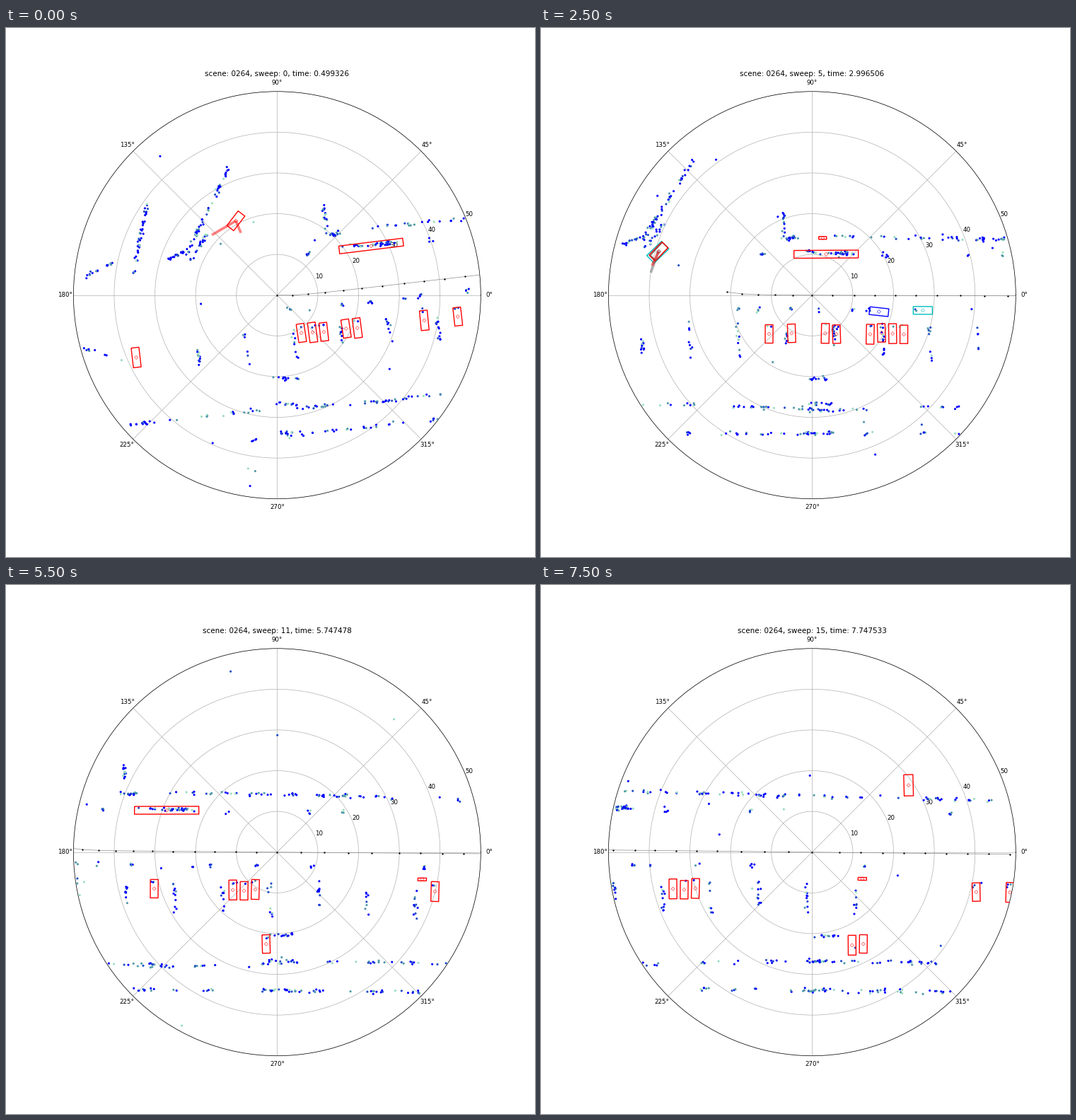
These frames come from a looping animation (748 px wide and 748 px high, 8 s). A matplotlib script:

```python
import numpy as np
import matplotlib.pyplot as plt
from matplotlib.animation import FuncAnimation
from matplotlib.collections import LineCollection
from matplotlib.transforms import Affine2D

SIZE, INCHES, RADIUS, SWEEPS = 748, 12, 287, 16
ROW_START, PITCH, NO_BAY = -153, 15.88, (3, 10)

# Sweep timestamps: key times with even steps between them
TIMES = np.interp(range(SWEEPS), [0, 3, 5, 7, 11, 13, 15],
                  [0.499326, 1.99786, 2.996506, 3.997414, 5.747478, 6.747805, 7.747533])

# Parked cars: distance from the road, bays, first and last sweep they are detected
PARKED = [(54, range(0, 6), 0, 1), (54, range(11, 15, 3), 0, 5),
          (54, range(6, 10), 2, 3), (54, range(7, 9), 4, 7),
          (54, range(12, 14), 4, 5), (54, range(2, 5, 2), 4, 8),
          (54, range(6, 7), 6, 11), (54, range(13, 16), 9, 15),
          (54, range(11, 13), 12, 14), (54, range(31, 32), 9, 13),
          (54, range(33, 34), 12, 13), (54, range(40, 44, 3), 14, 15),
          (130, range(9, 11), 6, 8), (130, range(16, 17), 9, 11),
          (130, range(11, 15), 12, 13), (130, range(31, 35), 12, 13),
          (130, range(29, 31), 14, 15)]

# Other road users: x, y, width, height, tilt, colour, first and last sweep
OTHERS = [(-41, -58, 91, 11, -.5, "red", 0, 14), (-389, 61, 11, 28, 0, "red", 0, 0),
          (-256, -173, 26, 13, -2, "red", 3, 3), (-46, -81, 11, 4, 0, "red", 3, 5),
          (18, -86, 12, 27, -2, "green", 3, 3), (83, 24, 27, 15, 37, "c", 2, 3),
          (96, 21, 27, 11, 0, "c", 4, 5), (34, 23, 27, 11, 6, "blue", 4, 5),
          (321, 37, 12, 4, 0, "red", 10, 15), (385, -96, 13, 30, -2, "red", 14, 15)]

SHADES = np.array([[0, 0, 1], [.12, .3, .78], [.31, .6, .66], [.6, .87, .74]])
SHADE_ODDS = [.55, .17, .16, .12]


def drive(t):
    """Distance along the road: speeds up until it cruises at 67 px/s."""
    t = t - TIMES[0]
    return 67 * t - 55 * (1 - np.clip(1 - t / 3.75, 0, 1) ** 1.75) - 181


def drift(i):
    return -4 * np.exp(-np.asarray(i, float))


def heading(i):
    return .04 * i - 6.5 * np.exp(-(i / 1.8) ** 2)


def to_ego(pts, i):
    pose = Affine2D().translate(-drive(TIMES[i]), -drift(i)).rotate_deg(heading(i))
    return pose.transform(pts)


def box(x, y, w, h, tilt=0):
    corners = np.array([[-1, -1], [1, -1], [1, 1], [-1, 1], [-1, -1]]) * [w / 2, h / 2]
    return Affine2D().rotate_deg(tilt).translate(x, y).transform(corners)


def echoes(rng, x0, y0, x1, y1, n):
    """Small clumps of points along a segment."""
    a, step = np.array([x0, y0]), np.array([x1 - x0, y1 - y0])
    t = np.repeat(rng.random(n // 3 + 1), 3)[:n, None]
    along = rng.normal(0, 4.5, (n, 1)) * step / np.hypot(*step)
    return a + t * step + along + rng.normal(0, 1.2, (n, 2))


def build_world(rng):
    hedge = echoes(rng, -420, 155, 450, 155, 200)
    hedge[:, 1] += 7 * np.exp(-((hedge[:, 0] + 20) / 140) ** 2)
    parts = [hedge,
             echoes(rng, -310, 196, 560, 196, 165),
             echoes(rng, -40, -84, 500, -75, 140),
             echoes(rng, -84, -62, 2, -58, 70),
             # buildings at the western crossing
             echoes(rng, -231, -188, -300, -78, 90),
             echoes(rng, -268, -104, -294, -69, 28),
             echoes(rng, -329, -71, -300, -82, 36),
             echoes(rng, -347, -159, -382, -50, 76),
             echoes(rng, -449, -60, -410, -75, 24),
             echoes(rng, -460, 40, -415, 60, 20),
             echoes(rng, -102, -123, -100, -82, 26),
             echoes(rng, -104, -81, -85, -81, 20)]
    # evenly spaced garden walls, then kerb posts and lamp posts
    parts += [echoes(rng, x, 44, x + 3, 88, 16) for x in range(-302, 320, 68)]
    parts += [rng.normal((x, 20), 1.8, (5, 2))
              for x in (-165, -137, -90, -52, -6, 21, 86, 165, 323)]
    parts += [rng.normal((x, -57), 1.8, (5, 2)) for x in (-130, 43, 162, 210, 445)]
    return np.vstack(parts)


seed = np.random.default_rng(264)
world = build_world(seed)
tone = seed.choice(4, len(world), p=SHADE_ODDS)


def parked(i):
    for y, bays, first, last in PARKED:
        if first <= i <= last:
            for bay in bays:
                if y > 100 or bay not in NO_BAY:
                    yield ROW_START + PITCH * bay, y, bay


def turning_car(i):
    keys = [0, 3, 5]
    return np.interp(i, keys, [-227, -264, -278]), np.interp(i, keys, [-115, -76, -61])


def points(i):
    rng = np.random.default_rng([i, 17])
    keep = rng.random(len(world)) < .6
    seen = world[keep] + rng.normal(0, .8, (keep.sum(), 2))
    fronts = [rng.normal((x, y - 10), (3, 2), (rng.integers(0, 4), 2))
              for x, y, _ in parked(i)]
    # echoes that stay abeam of the moving sensor, and a few strays
    side = [echoes(rng, -8, y, 26, y, 12) for y in (118, 154, 195)]
    a, r = rng.uniform(0, 2 * np.pi, 9), rng.uniform(90, 280, 9)
    stray = np.column_stack([r * np.cos(a), r * np.sin(a)])
    xy = np.vstack([to_ego(np.vstack([seen] + fronts), i)] + side + [stray])
    new = rng.choice(4, len(xy) - len(seen), p=SHADE_ODDS)
    shade = np.concatenate([tone[keep], new])
    inside = np.hypot(*xy.T) < RADIUS
    return xy[inside], SHADES[shade[inside]]


def boxes(i):
    """Outlines and small centre marks of everything detected in a sweep."""
    found = [(x, y + bay % 3 - 1, 11, 26 + 2 * (bay % 2), bay % 4 - 2, "red")
             for x, y, bay in parked(i)]
    found += [o[:6] for o in OTHERS if o[6] <= i <= o[7]]
    if i < 6:
        x, y = turning_car(i)
        if i > 1:
            found += [(x - 1, y + 1, 29, 15, -44, "c"), (x + 1, y, 25, 11, -47, "dimgray")]
        found.append((x, y, 26, 12, -46, "red"))
    outlines = [to_ego(box(*f[:5]), i) for f in found]
    marks = [to_ego(box(*f[:2], 3.6, 3.6, 45), i) for f in found]
    return outlines, marks, [f[5] for f in found]


def arrows(i):
    if i > 5:
        return [], []
    start = to_ego([turning_car(i)], i)[0]
    tips = [(-34, 20), (7, 17)] if i < 2 else [(-11, 30), (-9, 20)]
    return [[start, start + tip] for tip in tips], ["red" if i < 2 else "dimgray", "red"]


fig = plt.figure(figsize=(INCHES, INCHES), dpi=SIZE / INCHES)
ax = fig.add_subplot(projection="polar")
ax.set_ylim(0, 50)
ax.set_yticks(range(10, 51, 10))
ax.autoscale(False)

# Pixels around the sensor, y down
stage = Affine2D().scale(1 / SIZE, -1 / SIZE).translate(.5125, .495) + fig.transFigure


def lines(width, order, **kw):
    return ax.add_collection(LineCollection([], linewidths=width, zorder=order,
                                            transform=stage, **kw), autolim=False)


path, = ax.plot([], [], "-", color="0.55", lw=.8, marker="o", ms=2.7, mfc="black",
                mec="none", transform=stage, zorder=3)
dots = ax.scatter([0], [0], s=13, linewidths=0, transform=stage, zorder=4)
outline = lines(1.6, 5)
centre = lines(.8, 5, alpha=.7)
speed = lines(4.2, 6, alpha=.5)

ahead = TIMES[-1] + .13 + .45 * np.arange(1, 10)
route_x = drive(np.append(TIMES, ahead))
route = np.column_stack([route_x, drift(np.arange(len(route_x)))])


def update(i):
    ax.set_title(f"scene: 0264, sweep: {i}, time: {round(TIMES[i], 6)}")
    path.set_data(*to_ego(route, i).T)
    xy, colours = points(i)
    dots.set_offsets(xy)
    dots.set_facecolor(colours)
    outlines, marks, cols = boxes(i)
    outline.set_segments(outlines)
    outline.set_color(cols)
    centre.set_segments(marks)
    centre.set_color(cols)
    segs, cols = arrows(i)
    speed.set_segments(segs)
    speed.set_color(cols)
    return path, dots, outline, centre, speed


anim = FuncAnimation(fig, update, frames=SWEEPS, interval=500, repeat=True)
plt.show()
```
